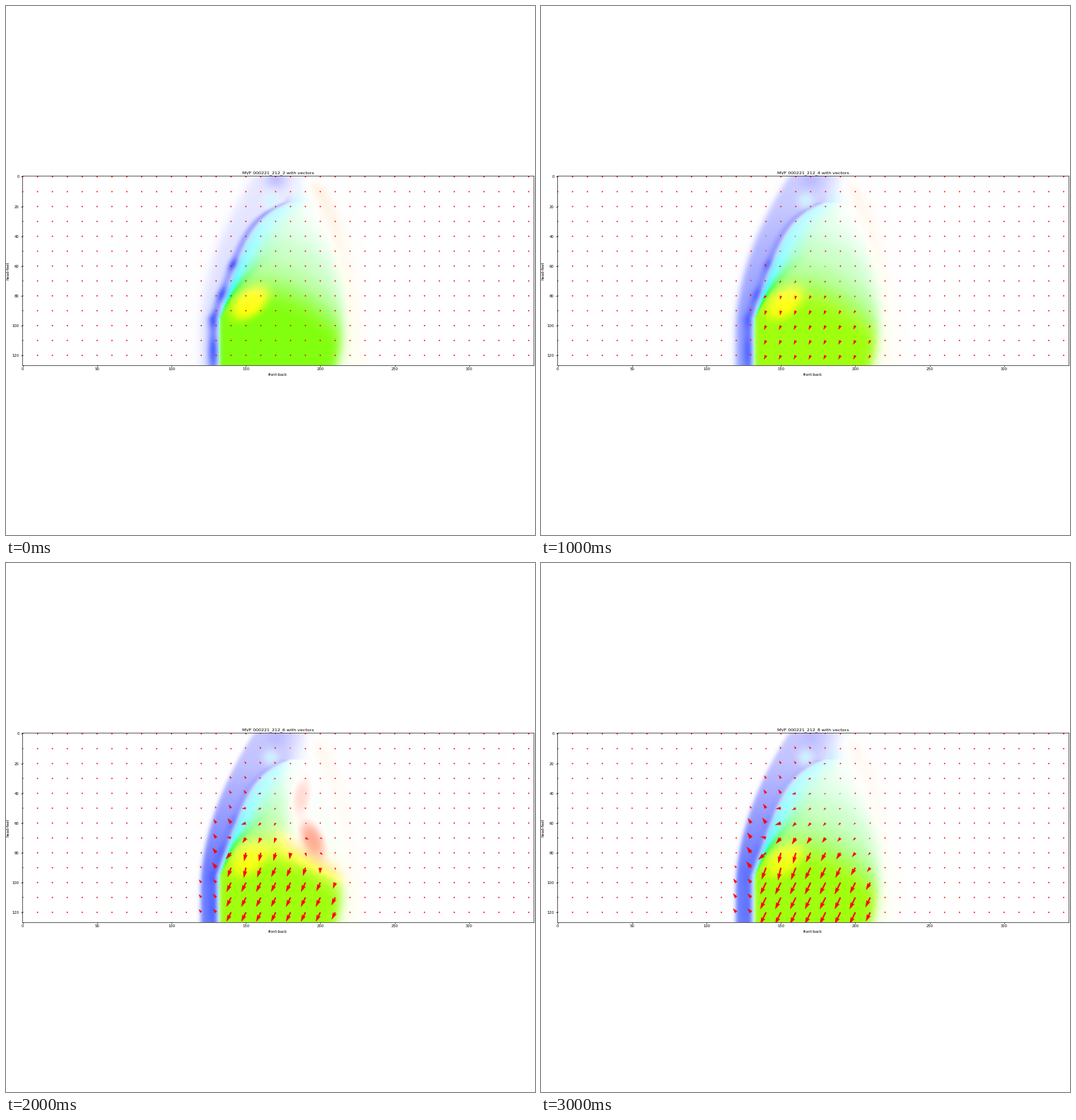
Animation, 748 px wide and 748 px high, one loop 3500 ms. Source, as a matplotlib script:

```python
import numpy as np
import matplotlib.pyplot as plt
from matplotlib.animation import FuncAnimation

DPI = 37.4
SIDE = 748
COLS, ROWS = 344, 127
UNIT = 2.1044            # pixels per data unit
LEFT, TOP = 22.5, 240.4  # axes corner in pixels
STEPS = 7
REACH = 20               # longest arrow in pixels

x, y = np.meshgrid(np.arange(COLS), np.arange(ROWS))


def step(d, soft):
    return 1 / (1 + np.exp(-np.clip(d / soft, -40, 40)))


def bump(d, width):
    return np.exp(-(d / width) ** 2)


def blob(cx, cy, sx, sy, tilt=0, power=1):
    t = np.radians(tilt)
    dx, dy = x - cx, y - cy
    a = (dx * np.cos(t) + dy * np.sin(t)) / sx
    b = (dy * np.cos(t) - dx * np.sin(t)) / sy
    return np.exp(-(a * a + b * b) ** power)


def polar(size, deg):
    return size * np.exp(1j * np.radians(deg))


def wheel(flow):
    """Colour a complex flow field by direction and size."""
    size = np.clip(np.abs(flow), 0, 1)[..., None]
    pos = np.degrees(np.angle(flow)) % 360 / 360 * 54
    knots = [0, 15, 21, 25, 36, 49, 55]
    hue = np.stack([np.interp(pos, knots, c) for c in (
        [1, 1, 0, 0, 0, 1, 1],
        [0, 1, 1, 1, 0, 0, 0],
        [0, 0, 0, 1, 1, 1, 0])], axis=-1)
    return 1 - size * (1 - hue)


# Anatomy outlines
outer = 119.5 + 35.5 * np.clip(1 - y / 105, 0, 1) ** 1.9
ridge = (128.3 + 28 * np.clip((95 - y) / 78, 0, None)
         + 22 * np.exp(-np.clip(y - 17, 0, None) / 10))
right = 215 - 40 * ((95 - y) / 95) ** 2
strip = 193 + 34 * (1 - np.exp(-y / 50))
depth = y - (72 + 25 * ((x - 158) / 52) ** 2)


def wall(t):
    """Chest wall: a thin line first, then the whole band moves."""
    ease = np.sin(np.pi / 2 * min(1, 1.35 * t))
    fade = np.interp(y, [0, 20, 90], [0.36, 0.42, 1]) ** (0.3 + 0.7 * ease)
    band = (step(x - outer, 2 - 1.2 * ease)
            * step(ridge + 2 - x, np.where(y < 18, 4, 0.8)))
    spots = sum(bump(y - c, h) for c, h in [(59, 4), (79, 5), (96, 6), (117, 11)])
    line = bump(x - ridge + 0.5, 2.4 + y / 90) * step(y - 17, 2)
    size = band * fade * (0.13 + 0.45 * ease)
    size += 0.75 * np.exp(-2.4 * t) * line * (0.35 + 0.4 * spots)
    size += (0.05 + 0.1 * np.exp(-5 * t)) * blob(170, 2, 7, 6)
    size *= 1 - 0.75 * blob(166.5, 16, 5, 5)
    return polar(size, 240 - 10 * y / ROWS)


def lung(t, counter):
    size = np.interp(depth, [-60, -40, -20, -8, 0, 10, 18],
                     [0.03, 0.12, 0.24, 0.4, 0.6, 0.85, 0.94])
    deg = np.interp(depth, [-40, -10, 8], [145, 129, 121 - 5 * min(1, 3 * t)])

    near = 0.3 + 15 * step(68 - y, 9)
    cyan = bump(np.clip(x - ridge - 3, 0, None), near)
    deg += (172 - deg) * cyan
    size += 0.16 * cyan * step(80 - y, 6)

    glow = (1 - 0.2 * t) * blob(152.5, 84.5, 15, 9, -40, 2)
    deg += (99 - deg) * glow
    size = np.maximum(size, 0.85 * glow)

    if counter:
        edge = 74 + 0.5 * (x - 178)
        size *= 1 - 0.85 * step(x - 177, 2.5) * step(edge - y, 3.5)
        turn = bump(y - edge, 9) * step(x - 172, 4)
        rim = bump(depth - 5, 7) * step(180 - x, 4) * step(x - 142, 3)
        deg += (85 - deg) * turn
        deg += (102 - deg) * 0.75 * rim

    start = ridge + 2.5 + 1.5 * step(y - 85, 6)
    mask = step(x - start, 0.7) * (
        0.93 * step(right - x, 2 + 2 * step(75 - y, 8))
        + 0.07 * step(right + 8 - x, 3))
    return polar(size * mask, deg)


def field(i):
    t = i / (STEPS - 1)
    counter = 3 <= i <= 4
    flow = wall(t) + lung(t, counter)
    flow += polar(0.17 * blob(166.5, 16, 4.5, 5), 172)
    pale = (0.45 + 0.55 * np.exp(-3.5 * t)) * step(y - 5, 2)
    pale = pale * (0.03 + 0.1 * np.exp(-y / 45))
    flow += polar(pale * bump(x - strip, 6), 48 + 0.28 * y)
    if counter:
        flow += polar(0.42 * blob(194.5, 71.5, 7, 13, -25, 1.5)
                      + 0.18 * blob(187, 43, 5.5, 12, 10, 1.5), 14)
    return flow


plt.rcParams.update({"axes.linewidth": 1.2, "xtick.major.width": 1.2,
                     "ytick.major.width": 1.2})
fig = plt.figure(figsize=(SIDE / DPI, SIDE / DPI), dpi=DPI, facecolor="white")
w, h = COLS * UNIT, ROWS * UNIT
ax = fig.add_axes([LEFT / SIDE, 1 - (TOP + h) / SIDE, w / SIDE, h / SIDE])
image = ax.imshow(np.ones((ROWS, COLS, 3)), aspect="auto")
gx, gy = x[::10, ::10], y[::10, ::10]
arrows = ax.quiver(gx, gy, np.zeros(gx.shape), np.zeros(gx.shape),
                   color="red", scale=1, scale_units="dots")
ax.set_xlim(-0.5, COLS - 0.5)
ax.set_ylim(ROWS - 0.5, -0.5)
ax.set_xlabel("front-back", labelpad=6)
ax.set_ylabel("head-feet", labelpad=6)
title = ax.set_title("")


def update(i):
    flow = field(i)
    image.set_data(np.clip(wheel(flow), 0, 1))
    grow = np.sin(np.pi / 2 * (i / (STEPS - 1)) ** 1.3)
    v = flow[::10, ::10] * REACH * grow
    arrows.set_UVC(v.real, -v.imag)
    title.set_text(f"MVF 000221_212_{i + 2} with vectors")
    return image, arrows, title


anim = FuncAnimation(fig, update, frames=STEPS, interval=500, repeat=True,
                     repeat_delay=0, blit=False)
plt.show()
```
